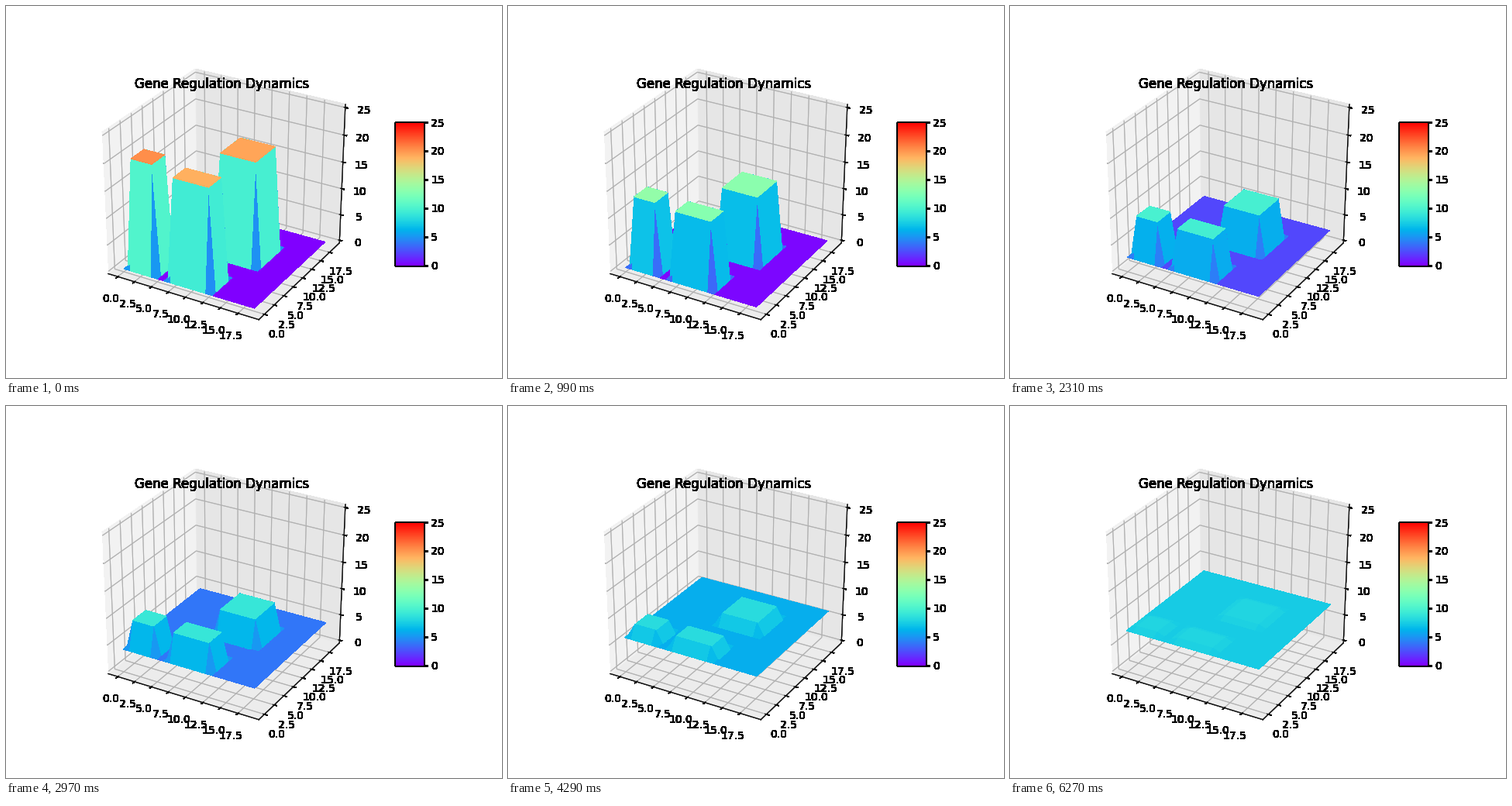
A matplotlib script that plays this animation: 640x480 px, repeating every 6600 ms.

```python
import numpy as np
import matplotlib.pyplot as plt
from matplotlib.animation import FuncAnimation
from matplotlib.cm import ScalarMappable
from matplotlib.colors import Normalize

SIZE = 20
FRAMES = 20
INTERVAL = 330
TOP = 25

# Saturating production against linear decay, per step
RATE, HALF, DECAY = 2.52, 1.9, 0.26
BASE = 0.035

# (x range, y range, starting level) of each active region
REGIONS = [
    ((1, 5), (1, 5), 20.3),
    ((7, 13), (1, 5), 18.9),
    ((9, 15), (9, 15), 19.4),
]


def start_levels():
    z = np.full((SIZE, SIZE), BASE)
    for (x0, x1), (y0, y1), level in REGIONS:
        z[y0:y1, x0:x1] = level
    return z


def levels(step):
    z = start_levels()
    for _ in range(step):
        z = z + RATE * z / (HALF + z) - DECAY * z
    return z


def padded(low, high, share):
    pad = (high - low) * share
    return low - pad, high + pad


def harden(img, dpi):
    """Make every covered pixel fully opaque, for crisp unsmoothed edges."""
    out = img.copy()
    out[..., 3] = out[..., 3] > 0
    return out, 0, 0


fig = plt.figure(figsize=(6.4, 4.8), dpi=100, facecolor="white")
ax = fig.add_subplot(projection="3d")
ax.patch.set_alpha(0)
ax.set_title("Gene Regulation Dynamics", y=0.92)

norm = Normalize(0, TOP)
xs, ys = np.meshgrid(np.arange(SIZE), np.arange(SIZE))
bar = fig.colorbar(ScalarMappable(norm, "rainbow"), ax=ax, shrink=0.5, aspect=5)
bar.ax.patch.set_alpha(0)
for part in (ax, bar.ax):
    part.set_agg_filter(harden)

# A cube with edge 25/24, stretched to fill the whole axes rectangle
ax.set_box_aspect((1, 1, 1), zoom=np.sqrt(3) / 1.8294640721620434)
ax.apply_aspect = lambda position=None: None

# Walls stand 1/48 of the range beyond the axis limits
side = padded(*padded(0, SIZE - 1, 0.05), 1 / 48)
height = padded(0, TOP, 1 / 48)
surface = None


def update(step):
    global surface
    if surface is not None:
        surface.remove()
    surface = ax.plot_surface(xs, ys, levels(step), cmap="rainbow", norm=norm,
                              linewidth=0, antialiased=False)
    ax.set(xticks=np.arange(0, 20, 2.5), yticks=np.arange(0, 20, 2.5),
           zticks=np.arange(0, TOP + 1, 5))
    ax.set(xlim=side, ylim=side, zlim=height)
    return surface,


anim = FuncAnimation(fig, update, frames=FRAMES, interval=INTERVAL,
                     repeat=True, repeat_delay=0, init_func=lambda: update(0))
plt.show()
```
